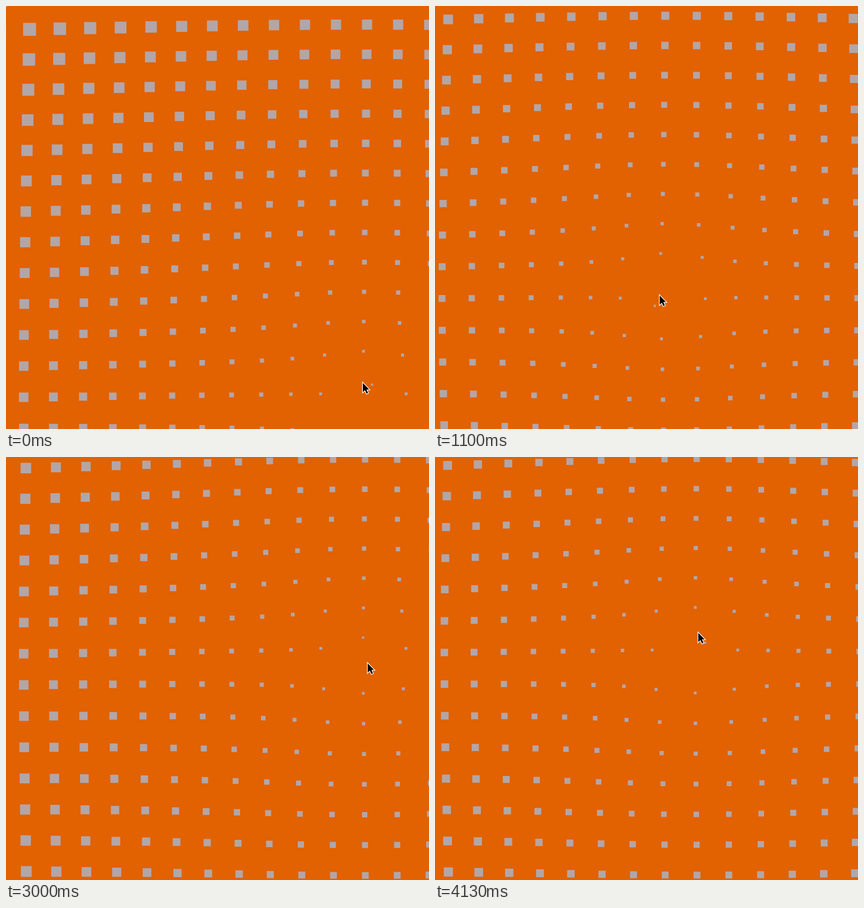
Animation, 748 px wide and 748 px high, one loop 4.27 s. Source, as an HTML page with a canvas:

```html
<!DOCTYPE html>
<html lang="en">
<head>
<meta charset="utf-8">
<title>Grid and pointer</title>
<style>
  html, body { margin: 0; width: 100%; height: 100%; overflow: hidden; background: #e26100; }
  canvas { display: block; width: 748px; height: 748px; }
</style>
</head>
<body>
<canvas id="stage" width="748" height="748"></canvas>
<script>
const ctx = document.getElementById('stage').getContext('2d');
const SIZE = 748, LOOP = 4270;
const GRID = { x: -1.9, y: -5.3, step: 57.4, count: 15 };
const PUSH = 22.5, PULL = 0.075;
const MIN_SIDE = 3.8, SIDE_GROWTH = 0.0205;
const LEAD = 33; // the arrow runs slightly ahead of the field

// Key points of the pointer's path, joined by a smooth curve
const PATH = [
  { t: 0, x: 629, y: 684 }, { t: 400, x: 650, y: 478 },
  { t: 700, x: 602, y: 413 }, { t: 900, x: 480, y: 415 },
  { t: 1100, x: 408, y: 501 }, { t: 1500, x: 308, y: 572 },
  { t: 1800, x: 329, y: 532 }, { t: 1900, x: 341, y: 495 },
  { t: 2500, x: 510, y: 561 }, { t: 2600, x: 520, y: 570 },
  { t: 2900, x: 602, y: 342 }, { t: 3400, x: 688, y: 567 },
  { t: 3500, x: 658, y: 532 }, { t: 4000, x: 430, y: 428 },
  { t: 4130, x: 456, y: 340 }, { t: 4200, x: 477, y: 277 }
];

const slope = (a, b, axis) => (b[axis] - a[axis]) / (b.t - a.t);

function tangent(i, axis) {
  const here = PATH[i], prev = PATH[i - 1], next = PATH[i + 1];
  if (!prev) return slope(here, next, axis);
  if (!next) return slope(prev, here, axis);
  const weight = (here.t - prev.t) / (next.t - prev.t);
  return slope(prev, here, axis) * (1 - weight) + slope(here, next, axis) * weight;
}

function pointerAt(time) {
  const end = PATH.findIndex(p => p.t > time), i = end - 1;
  const a = PATH[i], b = PATH[end], span = b.t - a.t;
  const u = (time - a.t) / span, v = 1 - u;
  const along = axis =>
    v * v * (1 + 2 * u) * a[axis] + u * u * (3 - 2 * u) * b[axis] +
    span * u * v * (v * tangent(i, axis) - u * tangent(end, axis));
  return { x: along('x'), y: along('y') };
}

// The picture changes in 100 ms steps, with two longer holds
function stepTime(time) {
  if (time >= 4130) return 4130;
  const step = Math.min(4000, Math.floor(time / 100) * 100);
  return step === 1700 ? 1600 : step;
}

function drawGrid(mouse) {
  ctx.fillStyle = '#b2a6a8';
  for (let row = -1; row < GRID.count; row++) {
    for (let col = -1; col < GRID.count; col++) {
      const x = GRID.x + col * GRID.step, y = GRID.y + row * GRID.step;
      const dx = x - mouse.x, dy = y - mouse.y;
      const dist = Math.hypot(dx, dy) || 1;
      const shift = PUSH / dist - PULL;
      const side = MIN_SIDE + dist * SIDE_GROWTH;
      ctx.fillRect(x + dx * shift, y + dy * shift, side, side);
    }
  }
}

const arrow = new Path2D('M0 0V16.2L3.8 12.7L6.6 18.8L9.2 17.7L6.5 11.6H11.2Z');

function drawArrow(tip) {
  ctx.save();
  ctx.translate(tip.x, tip.y);
  ctx.strokeStyle = '#fff';
  ctx.lineWidth = 2.4;
  ctx.stroke(arrow);
  ctx.fillStyle = '#000';
  ctx.fill(arrow);
  ctx.restore();
}

const start = performance.now();

function draw() {
  const time = stepTime((performance.now() - start) % LOOP);
  ctx.fillStyle = '#e26100';
  ctx.fillRect(0, 0, SIZE, SIZE);
  drawGrid(pointerAt(time));
  drawArrow(pointerAt(time + LEAD));
  requestAnimationFrame(draw);
}
draw();
</script>
</body>
</html>
```
